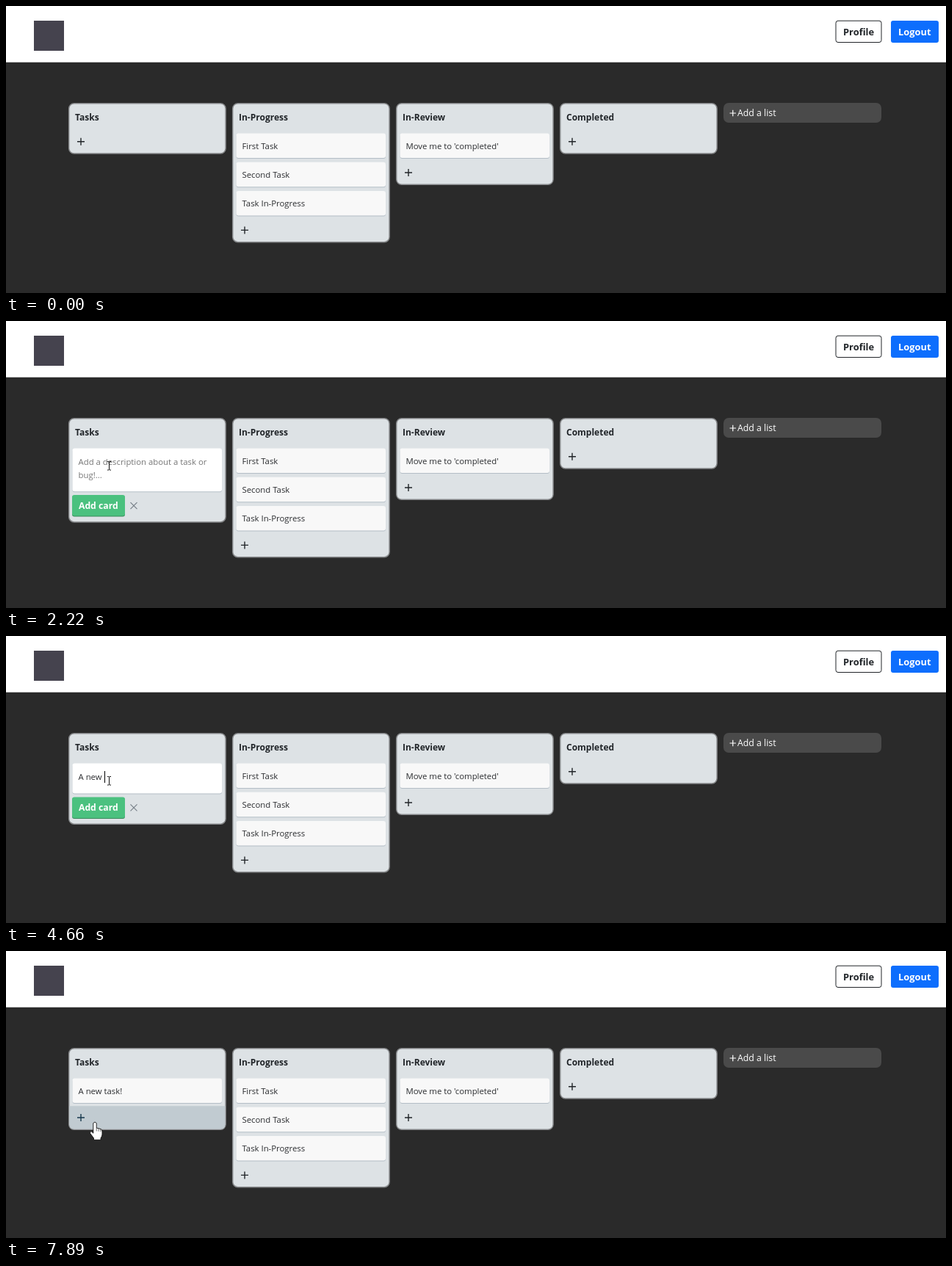
These frames come from a looping animation (1280 px wide and 391 px high, 8000 ms). An HTML page:

```html
<!DOCTYPE html>
<html lang="en">
<head>
<meta charset="utf-8">
<title>Task board</title>
<style>
html, body { margin: 0; width: 100%; height: 100%; overflow: hidden; background: #2a2a2a; }
svg { display: block; width: 1280px; height: 391px; }
text { font: 11.35px "Open Sans", "Noto Sans", sans-serif; fill: #2b2d30; white-space: pre; }
.head { font-size: 12px; font-weight: 700; fill: #212529; }
.btn { font-size: 12.9px; font-weight: 700; fill: #212529; }
.add { font-size: 12.2px; font-weight: 700; fill: #fff; }
.new { font-size: 12.3px; fill: #fff; }
.hint { fill: #767676; }
.tip { font-size: 10.3px; fill: #fff; }
</style>
</head>
<body>
<svg viewBox="0 0 1280 391">
  <rect width="1280" height="391" fill="#2a2a2a"/>
  <rect width="1280" height="76.7" fill="#fff"/>
  <rect x="38" y="20" width="41" height="41" fill="#45434e"/>
  <rect x="1130" y="20.2" width="62" height="29.3" rx="3" fill="#fff" stroke="#212529"/>
  <text class="btn" x="1140" y="39.6">Profile</text>
  <rect x="1205" y="20" width="65" height="30" rx="3" fill="#0d6efd"/>
  <text class="btn" x="1215" y="39.6" style="fill:#fff">Logout</text>
  <rect x="977" y="132" width="215" height="27" rx="7" fill="#4a4a4a"/>
  <path d="M985.5 146h8.5M989.75 141.75v8.5" stroke="#fff" stroke-width="1.2"/>
  <text class="new" x="996" y="150.3">Add a list</text>
  <g id="board"></g>
  <g id="live"></g>
</svg>
<script>
const LOOP = 8000;
const board = document.getElementById('board');
const live = document.getElementById('live');
const pen = document.createElement('canvas').getContext('2d');

function measure(str, size) {
  pen.font = size + 'px "Open Sans", "Noto Sans", sans-serif';
  return pen.measureText(str).width;
}

const text = (x, y, str, cls = '') => `<text class="${cls}" x="${x}" y="${y}">${str}</text>`;
const rect = (x, y, w, h, fill, r = 0, more = '') =>
  `<rect x="${x}" y="${y}" width="${w}" height="${h}" rx="${r}" fill="${fill}" ${more}/>`;
const frame = (x, bottom, title) =>
  rect(x + 0.7, 132.7, 213.4, bottom - 133.4, '#dde2e5', 7, 'stroke="#858789" stroke-width="1.5"') +
  text(x + 9, 156.2, title, 'head');
const slab = (x, y, h, fill = '#f8f8f8') =>
  rect(x + 5.5, y + 1, 203.5, h, '#b4bec6', 3) + rect(x + 5.5, y, 203.5, h, fill, 3);
const card = (x, y, label) => slab(x, y, 33.5) + text(x + 13.5, y + 21, label);
const plus = (x, y, color = '#212529') =>
  `<path d="M${x + 12} ${y}h10M${x + 17} ${y - 5}v10" stroke="${color}" stroke-width="1.4"/>`;

function list(x, title, cards, hover) {
  const end = cards.length ? 204.8 + 39.2 * cards.length : 201.7;
  let out = frame(x, end, title);
  if (hover) {
    const top = end - 32.7;
    out += `<path d="M${x + 1.4} ${top}h212v${25.3}q0 6-6 6h-200q-6 0-6-6z" fill="#c1cbd1"/>`;
  }
  cards.forEach((label, i) => { out += card(x, 173.6 + 39.2 * i, label); });
  return out + plus(x, end - 17, hover ? '#17394d' : '#212529');
}

board.innerHTML =
  list(308, 'In-Progress', ['First Task', 'Second Task', 'Task In-Progress']) +
  list(531, 'In-Review', ["Move me to 'completed'"]) +
  list(754, 'Completed', []);

// Typed text: [time, length]
const phrase = 'A new task!';
const keys = [[3470, 1], [3730, 2], [3930, 3], [4190, 4], [4390, 5], [4660, 6],
  [4860, 7], [5090, 8], [5320, 9], [5510, 10], [6180, 11]];

// Word suggestions: [from, to, left, right, words]
const tips = [
  [3530, 3730, 105, 208, 'As And Are'],
  [4060, 4190, 116, 246, 'not now nice'],
  [4190, 4460, 122, 282, 'never needed network'],
  [4460, 4520, 130, 260, 'news newer newly'],
  [4975, 5205, 138, 245, 'the to that'],
  [5205, 5720, 143, 271, 'take talk tables'],
  [5770, 6180, 154, 287, "tasks tasked task's"]
];

const blinkOff = [[1760, 2600], [3000, 3270], [5770, 6180], [6640, 6870], [7360, 7450]];
const within = (t, spans) => spans.some(([a, b]) => t >= a && t < b);

// Progress in n jumps, the first at a and the last at b
const jumps = (t, a, b, n) => Math.min(1, (Math.floor((t - a) / (b - a) * (n - 1) + 1e-6) + 1) / n);
const mix = (a, b, p) => a + (b - a) * p;
const easeOut = p => 1 - (1 - p) ** 2;

function pointer(t) {
  if (t < 500) return null;
  if (t < 1030) {
    const p = easeOut(jumps(t, 500, 890, 7));
    const x = mix(-4.8, 104, p), y = mix(249.6, 187, p);
    return { kind: x > 86 && y < 201 ? 'hand' : 'arrow', x, y };
  }
  if (t < 1230) return { kind: 'hand', x: 107, y: 186 };
  if (t < 2220) {
    const p = jumps(t, 1230, 1950, 11);
    return { kind: 'beam', x: mix(103.5, 142, p), y: mix(185.3, 194, p) };
  }
  if (t < 6570) return { kind: 'beam', x: 140, y: 197 };
  if (t < 7450) {
    const p = jumps(t, 6570, 7030, 7);
    const x = mix(140, 121, easeOut(p)), y = mix(197, 231, p ** 1.43);
    return { kind: y < 203 ? 'beam' : y < 220 ? 'grab' : 'hand', x, y };
  }
  return { kind: 'hand', x: 121, y: 233 };
}

const shapes = {
  arrow: '<path d="M0 0V16.5L3.8 13 6.4 19 9 17.9 6.5 12H11.6Z" fill="#fff" stroke="#000" stroke-width=".9"/>',
  beam: '<path d="M-2.5-5.5H-.8L0-5 .8-5.5H2.5M0-5V5.5M-2.5 6H-.8L0 5.5.8 6H2.5" fill="none" stroke="#111" stroke-width="1"/>',
  hand: '<path d="M-2.2 1.5Q0-1.5 2.2 1.5V8L8 9.5Q10 10 10 13V17Q10 19 8 22V24.3H-1.5V22L-6.3 15.5Q-7.3 12.3-4.5 13L-2.2 15.2Z" fill="#fff" stroke="#111" stroke-width=".9"/>' +
    '<path d="M2.2 8v4.5M5 8.8v4M7.7 9.5v3.5" stroke="#333" stroke-width=".7"/>',
  grab: '<path d="M-3.5 6.5L-6.8 1.5Q-6.8-.8-4.5.8L-5-4Q-4-6-2.8-4L-2-1V-6Q-1-7.4 0-6V-1L1-6Q2.5-7.2 3-5L2.8-1 4-4Q5.6-5 6-3L5 3 3.8 6.5Z" fill="#fff" stroke="#111" stroke-width="1"/>'
};

function editor(t, cur) {
  const key = keys.filter(k => t >= k[0]).pop();
  const typed = key ? phrase.slice(0, key[1]) : '';
  const h = typed ? 41 : 58.7;
  const low = 173.6 + h;
  let out = frame(85, low + 42.3, 'Tasks');
  if (cur.y < 215) out += slab(85, 173.6, h, '#fff');
  else out += slab(85, 173.6, h) + rect(97, 181, 185, 22.5, '#fff');

  if (typed) out += text(98.5, 196, typed);
  else out += text(98.5, 196, 'Add a description about a task or', 'hint') + text(98.5, 213.5, 'bug!...', 'hint');
  if (!within(t, blinkOff)) {
    out += rect(Math.round(99 + measure(typed, 11.35)), 184, 1, 16, '#000');
  }

  const top = low + 4.8;
  out += rect(90, top + 1, 72, 28.5, '#38895b', 3);
  out += rect(90, top, 72, 28.5, cur.kind === 'hand' ? '#43b877' : '#4bc17f', 3);
  out += text(99, top + 18.7, 'Add card', 'add');
  out += `<path d="M169.5 ${top + 10}l9 9m0-9l-9 9" stroke="#788089" stroke-width="1.2"/>`;

  const tip = tips.find(s => t >= s[0] && t < s[1]);
  if (tip) {
    out += rect(tip[2] + 0.5, 151, tip[3] - tip[2] - 1, 31.5, '#2b2b2b', 0, 'stroke="#3c3c3c" stroke-width=".8"');
    let x = tip[2] + 7.5;
    for (const word of tip[4].split(' ')) {
      out += text(x, 171, word, 'tip');
      x += measure(word, 10.3) + 15.5;
    }
  }
  return out;
}

function scene(t) {
  const cur = pointer(t);
  let out;
  if (t < 1230) out = list(85, 'Tasks', [], cur && cur.kind === 'hand');
  else if (t < 7450) out = editor(t, cur);
  else out = list(85, 'Tasks', [phrase], t >= 7890);
  if (cur) {
    out += `<g transform="translate(${Math.round(cur.x) + (cur.kind === 'beam' ? 0.5 : 0)} ${Math.round(cur.y)})">${shapes[cur.kind]}</g>`;
  }
  return out;
}

const start = performance.now();
let shown = '';
function draw() {
  const next = scene((performance.now() - start) % LOOP);
  if (next !== shown) live.innerHTML = shown = next;
  requestAnimationFrame(draw);
}
draw();
</script>
</body>
</html>
```
